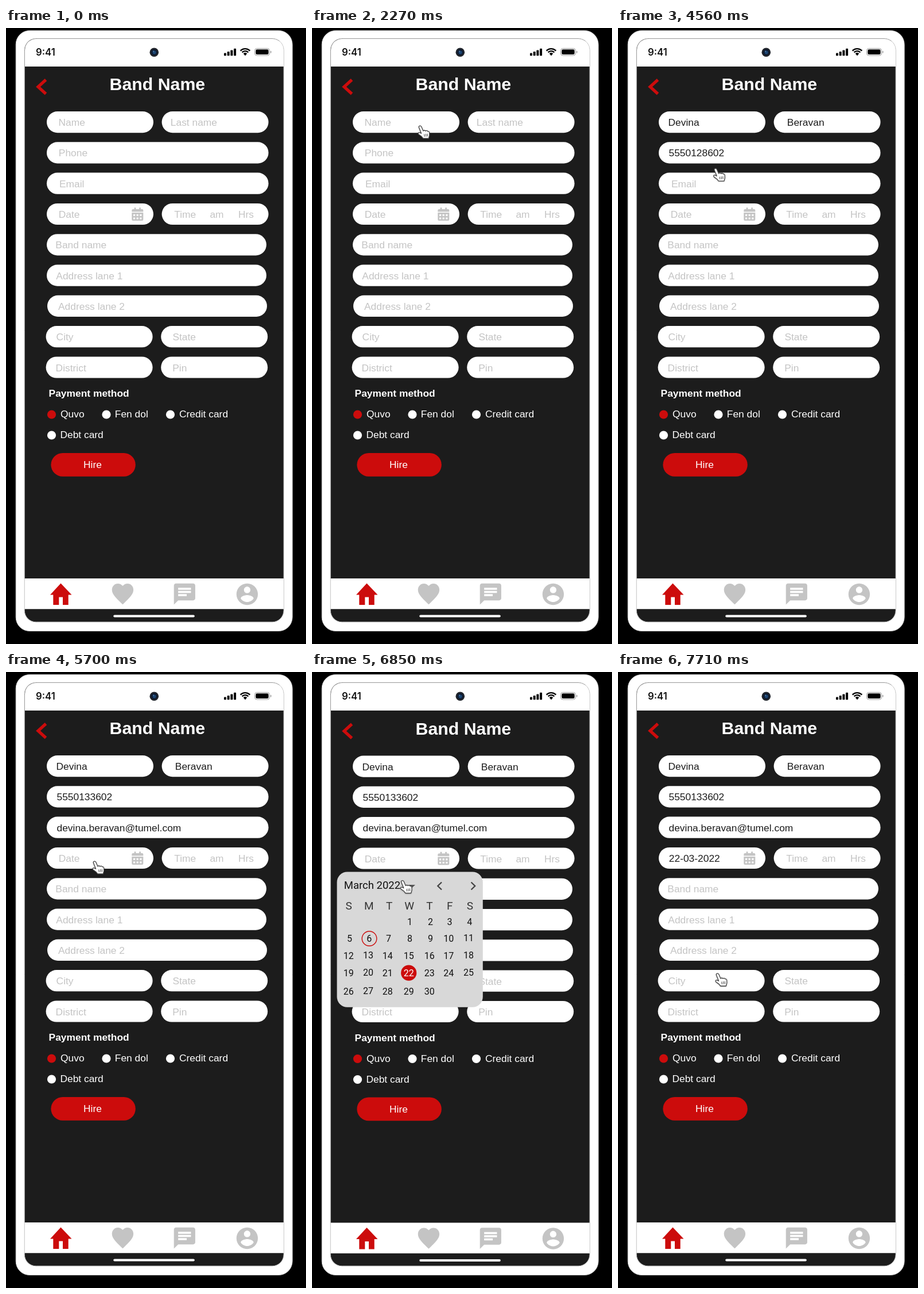
Animation, 523 px wide and 1071 px high, one loop 8000 ms. Source, as an HTML page with a canvas:

```html
<!DOCTYPE html>
<html lang="en">
<head>
<meta charset="utf-8">
<title>Booking form</title>
<style>
  html, body { margin: 0; width: 100%; height: 100%; overflow: hidden; background: #000; }
  canvas { display: block; width: 523px; height: 1071px; }
</style>
</head>
<body>
<canvas id="stage"></canvas>
<script>
const W = 523, H = 1071, LOOP = 8000;
const RED = '#cc0c0c', DARK = '#1c1c1c', GREY = '#c4c4c4', WHITE = '#fff';
const SANS = '"Liberation Sans", Arial, sans-serif';
const BODY = `17.4px ${SANS}`;
const canvas = document.getElementById('stage');
const ctx = canvas.getContext('2d');
const dpr = window.devicePixelRatio || 1;
canvas.width = Math.round(W * dpr);
canvas.height = Math.round(H * dpr);

// Moments at which the form changes
const NAMES_AT = 2600, PHONE_AT = 4070, EMAIL_AT = 5050, OPEN_AT = 5940, CLOSE_AT = 7710;
const ARROW_AT = 1250, HAND_AT = 1400;

// Pointer moves: first step, last step, number of steps, destination, ease-out power
const moves = [
  { from: 1325, to: 1400, steps: 2, x: 326, y: 131, ease: 1.2 },
  { from: 1560, to: 1560, steps: 1, x: 316, y: 136, ease: 1 },
  { from: 1800, to: 2270, steps: 7, x: 183, y: 168, ease: 1.5 },
  { from: 3420, to: 3740, steps: 5, x: 169, y: 215, ease: 1.6 },
  { from: 4560, to: 4810, steps: 4, x: 161, y: 264, ease: 2.8 },
  { from: 5370, to: 5700, steps: 5, x: 149, y: 327, ease: 1.6 },
  { from: 6850, to: 7470, steps: 9, x: 168, y: 522, ease: 1.6 }
];

const icons = {
  heart: new Path2D('M12 21.35l-1.45-1.32C5.4 15.36 2 12.28 2 8.5 2 5.42 4.42 3 7.5 3c1.74 0 3.41.81 4.5 2.09C13.09 3.81 14.76 3 16.5 3 19.58 3 22 5.42 22 8.5c0 3.78-3.4 6.86-8.55 11.54z'),
  chat: new Path2D('M20 2H4C2.9 2 2 2.9 2 4V22l4-4h14c1.1 0 2-.9 2-2V4c0-1.1-.9-2-2-2zM6 9h12v2H6zM6 12h8v2H6zM6 6h12v2H6z'),
  user: new Path2D('M12 2C6.48 2 2 6.48 2 12s4.48 10 10 10 10-4.48 10-10S17.52 2 12 2zM12 5c1.66 0 3 1.34 3 3s-1.34 3-3 3-3-1.34-3-3 1.34-3 3-3zM12 19.2c-2.5 0-4.71-1.28-6-3.22.03-1.99 4-3.08 6-3.08 1.99 0 5.97 1.09 6 3.08-1.29 1.94-3.5 3.22-6 3.22z'),
  home: new Path2D('M95.5 965.5L114.5 985.5H108.7V1003H99V989.5H92.3V1003H82.3V985.5H77z'),
  arrow: new Path2D('M0 0V19L4.4 15.2 7.4 22.2 10.8 20.8 7.8 13.9 13.6 13.5z'),
  hand: new Path2D('M3.3 4.6C3 1.8 6.6 1 7.8 3.8L11 11C12 9.5 14.4 9.8 15 11.2 16 9.9 18.2 10.2 18.7 11.8 20.2 11.2 21.6 12.4 21.7 14L21.8 18.5 20.4 24H10.8L8 20.6 3 17C1 15 2.6 13 4.8 13.8L7.6 15.2z'),
  creases: new Path2D('M12.6 16.5L13.4 21M15.5 16L16.1 20.8M18.2 15.8L18.5 20.4')
};

function box(x, y, w, h, r, fill, stroke) {
  ctx.beginPath();
  ctx.roundRect(x, y, w, h, r);
  ctx.fillStyle = fill;
  ctx.fill();
  if (stroke) {
    ctx.strokeStyle = stroke;
    ctx.lineWidth = 1;
    ctx.stroke();
  }
}

function dot(x, y, r, fill) {
  ctx.beginPath();
  ctx.arc(x, y, r, 0, Math.PI * 2);
  ctx.fillStyle = fill;
  ctx.fill();
}

function line(points, color, width) {
  ctx.beginPath();
  points.forEach(([x, y]) => ctx.lineTo(x, y));
  ctx.strokeStyle = color;
  ctx.lineWidth = width;
  ctx.stroke();
}

// x is the left edge of the visible ink
function label(str, x, y, color, font = BODY) {
  ctx.font = font;
  ctx.textAlign = 'left';
  ctx.fillStyle = color;
  ctx.fillText(str, x + ctx.measureText(str).actualBoundingBoxLeft, y);
}

function centered(str, x, y, color, font) {
  ctx.font = font;
  ctx.textAlign = 'center';
  ctx.fillStyle = color;
  ctx.fillText(str, x, y);
}

function icon(path, x, y, sx, sy, color) {
  ctx.save();
  ctx.translate(x, y);
  ctx.scale(sx, sy);
  ctx.fillStyle = color;
  ctx.fill(path, 'evenodd');
  ctx.restore();
}

function drawStatusBar() {
  box(33, 19, 451, 48, [19, 19, 0, 0], WHITE);
  label('9:41', 52, 48.3, '#111', '600 16.8px Inter, sans-serif');

  dot(258.3, 42.3, 7.8, '#20242b');
  dot(258.3, 42.3, 5, '#0b1a33');
  dot(258.6, 42.6, 3, '#1d4774');
  dot(257, 40.6, 1, '#5b83aa');

  for (let i = 0; i < 4; i++) {
    const h = 4.6 + i * 2.6;
    box(380 + i * 5.7, 48.2 - h, 4, h, 1, '#000');
  }

  ctx.strokeStyle = '#000';
  ctx.lineWidth = 2.4;
  for (const r of [7.4, 11.4]) {
    ctx.beginPath();
    ctx.arc(417, 47.5, r, -Math.PI * 0.76, -Math.PI * 0.24);
    ctx.stroke();
  }
  ctx.beginPath();
  ctx.moveTo(417, 48.3);
  ctx.arc(417, 47.5, 4.4, -Math.PI * 0.76, -Math.PI * 0.24);
  ctx.fillStyle = '#000';
  ctx.fill();

  box(433.5, 35.5, 26, 12.4, 4, WHITE, '#999');
  box(435.3, 37.3, 22.4, 8.8, 2.4, '#000');
  box(461, 39.8, 1.4, 4, 0.7, '#999');
}

function drawDateIcon() {
  box(219.3, 315, 20, 4.6, [2, 2, 0, 0], GREY);
  box(223.6, 312.2, 2.8, 5, 0.6, GREY);
  box(232.2, 312.2, 2.8, 5, 0.6, GREY);
  box(219.3, 321, 20, 14, [0, 0, 2, 2], GREY);
  for (let i = 0; i < 6; i++) {
    box(222 + (i % 3) * 5.6, 323.8 + (i > 2 ? 5.6 : 0), 3.2, 3.2, 0.4, WHITE);
  }
}

function field(x, row, w, hint, hintX, value, valueX) {
  const y = 145 + row * 53.3;
  box(x, y, w, 37.2, 18.6, WHITE);
  if (value) label(value, valueX, y + 25.1, DARK);
  else label(hint, hintX, y + 25.1, GREY);
}

function drawForm(t) {
  const named = t >= NAMES_AT;
  const mailed = t >= EMAIL_AT;
  const phone = mailed ? '5550133602' : t >= PHONE_AT ? '5550128602' : '';

  line([[69.5, 90], [56, 102.3], [69.5, 114.5]], RED, 5.2);
  label('Band Name', 182.5, 108, WHITE, `bold 30.3px ${SANS}`);

  field(71, 0, 186, 'Name', 92.5, named && 'Devina', 88.5);
  field(271.6, 0, 186, 'Last name', 287.8, named && 'Beravan', 295.8);
  field(71, 1, 386.6, 'Phone', 92.8, phone, 88.5);
  field(71, 2, 386.6, 'Email', 94, mailed && 'devina.beravan@tumel.com', 88.5);
  field(71, 3, 186, 'Date', 92.8, t >= CLOSE_AT && '22-03-2022', 88.8);
  field(271.6, 3, 186, 'Time', 293.2, '');
  label('am', 355.4, 330, GREY);
  label('Hrs', 406, 330, GREY);
  drawDateIcon();
  field(71, 4, 383, 'Band name', 87.3);
  field(71, 5, 383, 'Address lane 1', 87.3);
  field(72, 6, 383, 'Address lane 2', 91);
  field(69.6, 7, 186, 'City', 87.6);
  field(270.2, 7, 186, 'State', 290.4);
  field(69.6, 8, 186, 'District', 87.6);
  field(270.2, 8, 186, 'Pin', 291.2);

  label('Payment method', 75.6, 641, WHITE, `bold 17.4px ${SANS}`);
  dot(79.5, 672, 7.6, RED);
  dot(175, 672, 7.6, WHITE);
  dot(286.5, 672, 7.6, WHITE);
  dot(79.5, 708, 7.6, WHITE);
  label('Quvo', 95, 677.3, WHITE);
  label('Fen dol', 190.8, 677.3, WHITE);
  label('Credit card', 302, 677.3, WHITE);
  label('Debt card', 95.4, 713.2, WHITE);

  box(78.4, 739, 147.4, 40.8, 20.4, RED);
  label('Hire', 136, 765, WHITE);
}

function drawNav() {
  box(32.5, 957, 451.5, 53.2, 0, WHITE);
  ctx.fillStyle = RED;
  ctx.fill(icons.home);
  icon(icons.heart, 181, 960, 1.87, 1.98, GREY);
  icon(icons.chat, 289, 962.2, 1.86, 1.83, GREY);
  icon(icons.user, 398, 962, 1.87, 1.87, GREY);
  box(187.3, 1020.6, 141.5, 3.8, 1.9, WHITE);
}

function drawCalendar() {
  const roboto = size => `${size}px Roboto, sans-serif`;
  const cols = [63.7, 98, 131.7, 168.8, 204.7, 238.3, 273];
  const rows = [433.5, 463, 493, 522.5, 554.5];

  box(43.5, 347, 254.3, 235.3, 18, '#d8d8d8');
  label('March 2022', 56.8, 376, '#111', roboto(18.5));
  ctx.beginPath();
  ctx.moveTo(168, 369.5);
  ctx.lineTo(180, 369.5);
  ctx.lineTo(174, 375);
  ctx.fillStyle = '#555';
  ctx.fill();
  line([[226, 365], [219.3, 371.5], [226, 378]], '#444', 2.3);
  line([[277.5, 365], [284.2, 371.5], [277.5, 378]], '#444', 2.3);

  [...'SMTWTFS'].forEach((day, i) => centered(day, 64.2 + i * 35.2, 412.5, '#333', roboto(19)));

  for (let n = 1; n <= 30; n++) {
    const col = (n + 2) % 7, row = Math.floor((n + 2) / 7);
    const x = cols[col] + (n < 10 ? 1.8 : 0);
    const lift = row && (col === 6 || (col === 1 && row > 1)) ? 1 : 0;
    const y = rows[row] - lift;
    if (n === 6) {
      ctx.beginPath();
      ctx.arc(100, 463, 12.8, 0, Math.PI * 2);
      ctx.strokeStyle = RED;
      ctx.lineWidth = 1.4;
      ctx.stroke();
    }
    if (n === 22) dot(168.7, 522.7, 13.6, RED);
    centered(n, x, y + 5.8, n === 22 ? WHITE : '#111', roboto(16));
  }
}

function pointerAt(t) {
  let pos = { x: 488, y: 16 };
  for (const m of moves) {
    if (t < m.from) break;
    const gap = (m.to - m.from) / Math.max(1, m.steps - 1) || 1;
    const step = Math.min(m.steps, Math.floor((t - m.from) / gap + 1e-6) + 1);
    const p = 1 - (1 - step / m.steps) ** m.ease;
    pos = { x: pos.x + (m.x - pos.x) * p, y: pos.y + (m.y - pos.y) * p };
  }
  return pos;
}

function drawPointer(t) {
  if (t < ARROW_AT) return;
  const { x, y } = pointerAt(t);
  const isHand = t >= HAND_AT;
  const shape = isHand ? icons.hand : icons.arrow;
  ctx.save();
  ctx.translate(x, y);
  ctx.lineJoin = 'round';
  ctx.shadowColor = 'rgba(0,0,0,.4)';
  ctx.shadowBlur = 2.5 * dpr;
  ctx.shadowOffsetY = dpr;
  ctx.fillStyle = isHand ? WHITE : '#222';
  ctx.strokeStyle = isHand ? '#444' : '#e4e4e4';
  ctx.lineWidth = isHand ? 1.3 : 1.8;
  ctx.fill(shape);
  ctx.shadowColor = 'transparent';
  ctx.stroke(shape);
  if (isHand) {
    ctx.lineWidth = 1;
    ctx.stroke(icons.creases);
  }
  ctx.restore();
}

function draw(t) {
  ctx.setTransform(dpr, 0, 0, dpr, 0, 0);
  ctx.fillStyle = '#000';
  ctx.fillRect(0, 0, W, H);
  box(17.2, 4.5, 482, 1044, 24, WHITE, '#ccc');
  box(32.3, 18.3, 451.8, 1014.5, 20, DARK, '#b4b4b4');
  drawStatusBar();

  // The page sits half a pixel lower while the calendar is open
  const open = t >= OPEN_AT && t < CLOSE_AT;
  ctx.save();
  if (open) ctx.translate(0, 0.5);
  drawForm(t);
  drawNav();
  if (open) drawCalendar();
  ctx.restore();
  drawPointer(t);
}

function frame() {
  draw(performance.now() % LOOP);
  requestAnimationFrame(frame);
}
frame();
</script>
</body>
</html>
```
